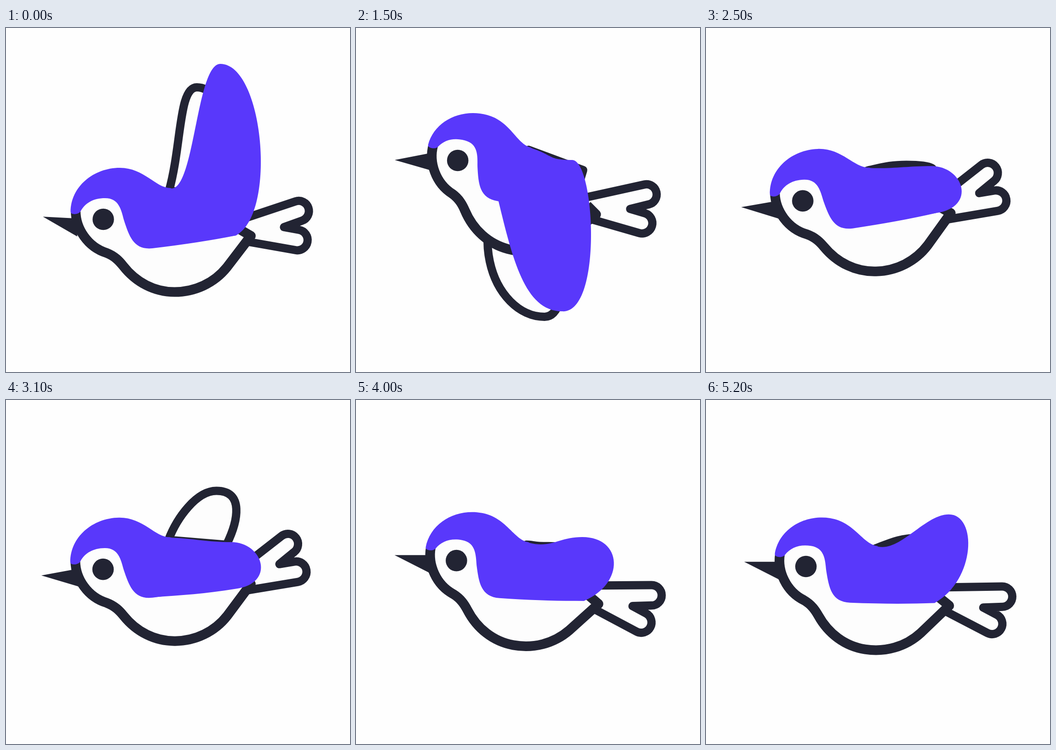
An HTML page with a canvas that plays this animation: 748x748 px, repeating every 5300 ms.

```html
<!DOCTYPE html>
<html lang="en">
<head>
<meta charset="utf-8">
<title>Flying bird</title>
<style>
  html, body { margin: 0; width: 100%; height: 100%; overflow: hidden; background: #fefefe; }
  canvas { display: block; width: 748px; height: 748px; }
</style>
</head>
<body>
<canvas id="stage" width="748" height="748"></canvas>
<script>
const ctx = document.getElementById('stage').getContext('2d');
const BLUE = '#5938fb', DARK = '#222433', WHITE = '#fdfdfd';
const LOOP = 5300, STEP = 100, FLAPS = 9, RAD = Math.PI / 180;

// Key phases of one flap, and what each moving value is there
const KEYS = [0, .189, .245, .4, .547, .792, .83];
const TRACKS = {
  eyeY:  [416, 395, 376, 306, 288, 349, 362],
  turn:  [0, -3.6, -1.7, 9, 14.9, 10.6, 8.9],
  tail:  [0, -19, -19.7, -10, 6, 18, 17.5],
  beak:  [3, -7, -10, -11.5, -11, 0, 0],
  tipX:  [466, 484, 490, 478, 470, 492, 528],
  tipY:  [-338, -158, -76, -3, -1, -51, -113],
  wide:  [94, 55, 70, 55, 50, 88, 62],
  lift:  [-49, -16, -13, 8, 8, -38, -51],
  droop: [0, 0, 0, 268, 220, 0, 0],
  backX: [415, 458, 436, 400, 410, 418, 460],
  backY: [-287, -177, -79, 328, 340, -31, -62]
};

// Resting shapes: the body turns around the eye, the tail around the rump
const EYE = [211, 416], RUMP = [528, 450];
const OUTLINE = 'M151 398C151 436 177 476 218 489C236 496 246 507 254 517' +
  'C282 553 322 574 366 574C410 574 452 555 480 520L532 452L508 438';
const body = new Path2D(OUTLINE);
const bodyFill = new Path2D(OUTLINE + 'L400 380L250 330L165 375Z');
const cap = new Path2D('M140 400C140 345 190 304 247 304C300 304 325 348 357 348' +
  'L440 380L500 451Q420 467 318 479C278 483 268 455 256 418C250 395 245 370 215 370' +
  'C190 370 172 380 162 398C158 406 141 407 140 400Z');
const tail = new Path2D('M500 420L629 377A22 22 0 0 1 643 419L604 433' +
  'L637 439A22 22 0 0 1 629 483L510 462Z');

// Cyclic cubic interpolation that never overshoots a key
function sample(track, phase) {
  const n = KEYS.length, p = phase - Math.floor(phase);
  const time = i => KEYS[(i + n) % n] + Math.floor(i / n);
  const value = i => track[(i + n) % n];
  const gap = i => time(i + 1) - time(i);
  const slope = i => (value(i + 1) - value(i)) / gap(i);
  const tangent = i => {
    const a = slope(i - 1), b = slope(i);
    if (a * b <= 0) return 0;
    const mean = (a * gap(i) + b * gap(i - 1)) / (gap(i) + gap(i - 1));
    return Math.sign(a) * Math.min(Math.abs(mean), 2 * Math.abs(a), 2 * Math.abs(b));
  };
  let k = n - 1;
  while (time(k) > p) k--;
  const u = (p - time(k)) / gap(k), w = 1 - u;
  return value(k) * w * w * (1 + 2 * u) + value(k + 1) * u * u * (3 - 2 * u)
    + gap(k) * u * w * (tangent(k) * w - tangent(k + 1) * u);
}

function poseAt(t) {
  const phase = t * FLAPS / LOOP;
  // The far wing briefly falls behind the near one
  const lag = .07 * Math.max(0, 1 - Math.abs(t - 3100) / 500);
  const pose = {};
  for (const name in TRACKS) {
    pose[name] = sample(TRACKS[name], name.startsWith('back') ? phase - lag : phase);
  }
  pose.eyeX = 211.5 + .65 * pose.turn;
  return pose;
}

// Stage position of a point on the resting body
function onBody(pose, x, y) {
  const c = Math.cos(pose.turn * RAD), s = Math.sin(pose.turn * RAD);
  const dx = x - EYE[0], dy = y - EYE[1];
  return [pose.eyeX + dx * c - dy * s, pose.eyeY + dx * s + dy * c];
}

const shift = ([x, y], dx, dy) => [x + dx, y + dy];
const mix = (p, q, k) => p.map((v, i) => v + (q[i] - v) * k);

// Closed shape of chained cubic curves
function curves(first, ...rest) {
  const path = new Path2D();
  path.moveTo(...first);
  for (let i = 0; i < rest.length; i += 3) path.bezierCurveTo(...rest.slice(i, i + 3).flat());
  path.closePath();
  return path;
}

function paint(path, fill, line) {
  if (fill) {
    ctx.fillStyle = fill;
    ctx.fill(path);
  }
  if (line) {
    ctx.strokeStyle = DARK;
    ctx.lineWidth = line;
    ctx.stroke(path);
  }
}

function turned([x, y], turn, origin, draw) {
  ctx.save();
  ctx.translate(x, y);
  ctx.rotate(turn * RAD);
  ctx.translate(-origin[0], -origin[1]);
  draw();
  ctx.restore();
}

function drawBackWing(pose) {
  const front = onBody(pose, 354, 354), rear = onBody(pose, 480, 366);
  const tip = [pose.backX, pose.eyeY + pose.backY];
  const bow = 28 - .86 * pose.droop, round = 40 + .32 * pose.droop;
  const halfway = root => root[1] + .45 * (tip[1] - root[1]);
  paint(curves(front,
    [front[0] + bow, halfway(front)], shift(tip, -round, 0), tip,
    shift(tip, 60, 0), [rear[0] + 30 - .35 * pose.droop, halfway(rear)], rear), WHITE, 18);
}

function drawFrontWing(pose) {
  const d = pose.droop;
  const back = onBody(pose, 359, 349), chest = onBody(pose, 319, 478);
  const tip = [pose.tipX, pose.eyeY + pose.tipY];
  const rear = shift(onBody(pose, 500, 451), -.2 * d, d);
  paint(curves(back,
    onBody(pose, 410, 352), shift(tip, -52, 0), tip,
    shift(tip, pose.wide, 0), shift(rear, 90, pose.lift), rear,
    shift(mix(rear, chest, 1 / 3), -.16 * d, .36 * d),
    shift(mix(chest, rear, 1 / 3), -.07 * d, .2 * d), chest), BLUE);
}

function drawBeak(pose) {
  const polar = ([x, y], len, deg) => [x + len * Math.cos(deg * RAD), y + len * Math.sin(deg * RAD)];
  const tip = polar(onBody(pose, 156.5, 433), -80, pose.beak + 13.5);
  const path = new Path2D();
  path.moveTo(...tip);
  path.lineTo(...polar(tip, 76, pose.beak));
  path.lineTo(...polar(tip, 86, pose.beak + 27));
  path.closePath();
  paint(path, DARK);
}

function drawEye(pose, t) {
  const shut = .93 * Math.max(0, 1 - Math.abs(t - 750) / 66);
  const r = 23.3, h = r * (1 - shut);
  const path = new Path2D();
  path.roundRect(pose.eyeX - r, pose.eyeY - h, 2 * r, 2 * h, h);
  paint(path, DARK);
}

function render(t) {
  const pose = poseAt(t);
  ctx.clearRect(0, 0, 748, 748);
  ctx.lineJoin = 'round';
  drawBackWing(pose);
  turned(onBody(pose, ...RUMP), pose.tail, RUMP, () => paint(tail, WHITE, 18));
  drawBeak(pose);
  turned([pose.eyeX, pose.eyeY], pose.turn, EYE, () => {
    paint(bodyFill, WHITE);
    paint(body, null, 21);
    paint(cap, BLUE);
  });
  drawFrontWing(pose);
  drawEye(pose, t);
}

const start = performance.now();
function tick() {
  const t = (performance.now() - start) % LOOP;
  render(Math.floor(t / STEP) * STEP);
  requestAnimationFrame(tick);
}
tick();
</script>
</body>
</html>
```
